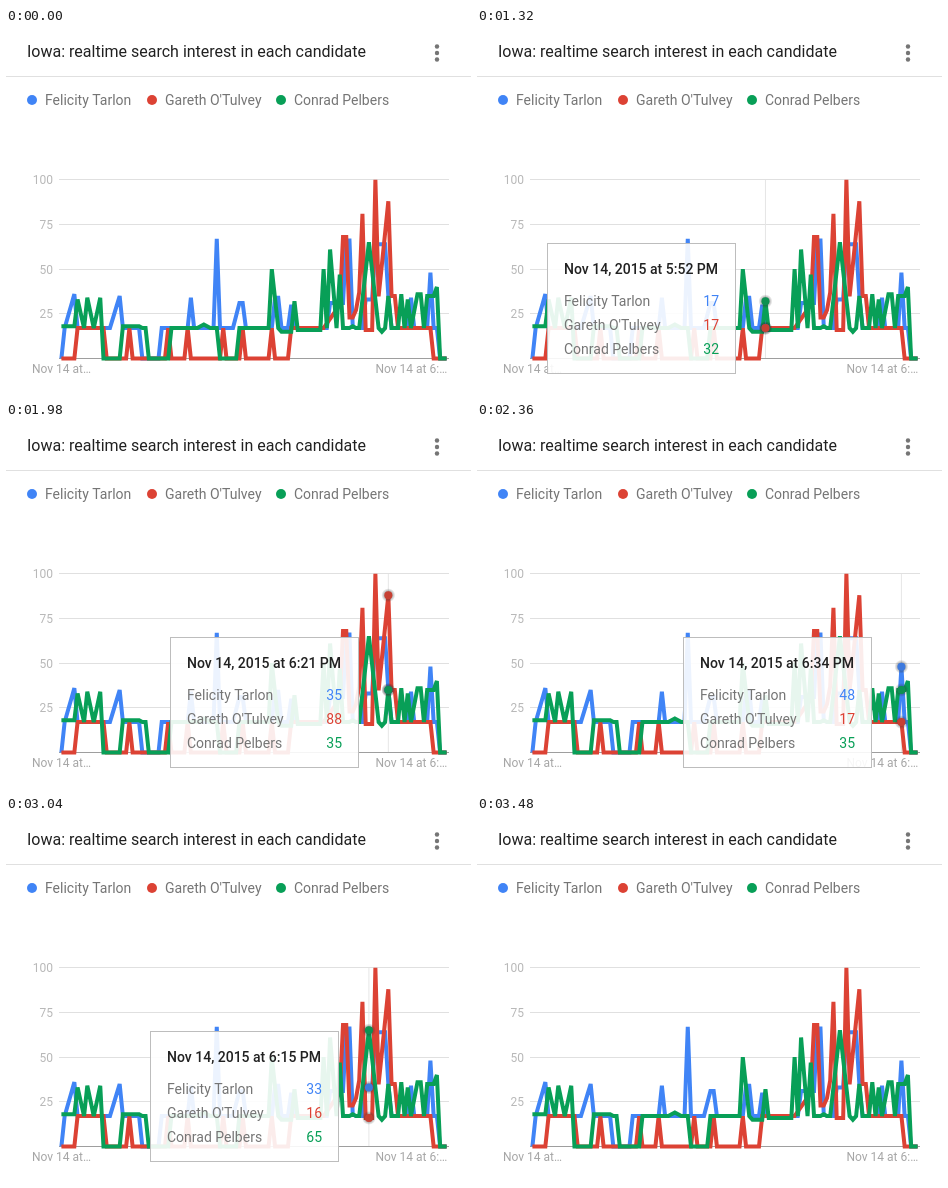
Write an HTML page with a canvas that moves like this. It is 465 px wide and 366 px high and loops after 4.24 s.

```html
<!DOCTYPE html>
<html lang="en">
<head>
<meta charset="utf-8">
<title>Search interest</title>
<style>
html, body { margin: 0; width: 100%; height: 100%; overflow: hidden; background: #fff; }
canvas { display: block; width: 465px; height: 366px; }
</style>
</head>
<body>
<canvas id="stage"></canvas>
<script>
const W = 465, H = 366, LOOP = 4240;
const TOP = 151.8, BASE = 330.5;
const LAST = 119, REST = 17;
const canvas = document.getElementById('stage');
const ctx = canvas.getContext('2d');
const dpr = window.devicePixelRatio || 1;
canvas.width = W * dpr;
canvas.height = H * dpr;
ctx.scale(dpr, dpr);

// A series rests at REST while active and at 0 otherwise.
// active: [from, to]; bumps: [from, to, height, rise, fall], in minutes.
const series = [
  { name: 'Felicity Tarlon', color: '#4084f6', legendX: 26,
    active: [[1, 24], [31, 116]],
    bumps: [[4, 4, 36, 3], [18, 18, 35, 3], [40, 40, 34], [48, 48, 67], [55, 56, 31, 2],
      [66, 67, 34], [71, 71, 30], [83, 87, 31], [88, 89, 66], [90, 90, 18], [94, 96, 33],
      [97, 100, 64], [101, 101, 35], [108, 108, 34], [114, 114, 48]] },
  { name: "Gareth O'Tulvey", color: '#dc4234', legendX: 146,
    active: [[5, 13], [21, 21], [33, 33], [39, 39], [50, 50], [56, 56], [65, 65], [71, 114]],
    bumps: [[86, 86, 30, 5], [87, 88, 68], [89, 90, 23], [92, 92, 37, 2], [93, 93, 81],
      [94, 96, 16], [97, 97, 100], [101, 101, 88, 4], [102, 103, 35]] },
  { name: 'Conrad Pelbers', color: '#089f57', legendX: 275,
    active: [[0, 12], [19, 26], [34, 48], [55, 116]],
    bumps: [[0, 4, 18], [5, 5, 33, 1, 2], [8, 8, 34, 1, 2], [12, 12, 34, 2], [19, 24, 18],
      [44, 44, 19, 2, 2], [65, 65, 50, 1, 2], [68, 71, 15], [72, 72, 32], [73, 80, 16],
      [81, 81, 50], [83, 83, 61, 1, 2], [86, 86, 47], [90, 90, 18], [95, 95, 65, 3, 3],
      [99, 99, 15], [101, 101, 35], [105, 105, 36], [107, 107, 33], [110, 111, 36, 2],
      [113, 115, 35], [116, 116, 40]] }
];

// Pointer sweeps between minutes; it rests in between and leaves at HIDE.
const HIDE = 3480, LEAD = 40;
const sweeps = [
  { start: 1040, end: 1320, from: 46, to: 72, ease: 1 },
  { start: 1460, end: 1980, from: 72, to: 101, ease: 2.2 },
  { start: 2200, end: 2360, from: 101, to: 114, ease: 1.5 },
  { start: 2660, end: 3140, from: 114, to: 93, ease: 1.5 },
  { start: 3200, end: 3240, from: 93, to: 90, ease: 1 },
  { start: 3380, end: 3440, from: 90, to: 78, ease: 1 }
];

const xAt = minute => 55.4 + 3.237 * minute;
const yAt = value => BASE - (BASE - TOP) * value / 100;

function valueAt({ active, bumps }, minute) {
  if (!active.some(([a, b]) => minute >= a && minute <= b)) return 0;
  let offset = 0;
  for (const [from, to, height, rise = 1, fall = 1] of bumps) {
    const away = Math.max((from - minute) / rise, (minute - to) / fall, 0);
    const d = (height - REST) * Math.max(0, 1 - away);
    if (Math.abs(d) > Math.abs(offset)) offset = d;
  }
  return REST + offset;
}

function hoverAt(t) {
  const s = sweeps.filter(s => s.start <= t).pop();
  if (!s || t >= HIDE) return null;
  const p = Math.min(1, (t - s.start + LEAD) / (s.end - s.start + LEAD));
  return Math.round(s.from + (s.to - s.from) * (1 - (1 - p) ** s.ease));
}

function clock(minute) {
  const total = 4 * 60 + 40 + minute;
  return Math.floor(total / 60) + ':' + String(total % 60).padStart(2, '0') + ' PM';
}

function text(str, x, y, size, color, align = 'left', weight = 400) {
  ctx.font = `${weight} ${size}px Roboto, Arial, sans-serif`;
  ctx.fillStyle = color;
  ctx.textAlign = align;
  ctx.fillText(str, x, y);
}

function disc(x, y, r, fill) {
  ctx.fillStyle = fill;
  ctx.beginPath();
  ctx.arc(x, y, r, 0, Math.PI * 2);
  ctx.fill();
}

function rect(x, y, w, h, fill) {
  ctx.fillStyle = fill;
  ctx.fillRect(x, y, w, h);
}

function drawHeader() {
  text('Iowa: realtime search interest in each candidate', 21, 29, 16, '#212121');
  for (const y of [18.5, 25, 31.5]) disc(431, y, 2.2, '#757575');
  rect(0, 48, W, 1, '#e0e0e0');
  for (const s of series) {
    disc(s.legendX, 72, 5, s.color);
    text(s.name, s.legendX + 13, 77, 14, '#757575');
  }
}

function drawAxes() {
  for (const v of [25, 50, 75, 100]) {
    const y = Math.floor(yAt(v));
    rect(53, y, 390, 1, '#e0e0e0');
    text(v, 47, y + 5, 12, '#b8b8b8', 'right');
  }
  rect(53, 330, 390, 1, '#9e9e9e');
  text('Nov 14 at…', 26, 345, 12, '#a6a6a6');
  text('Nov 14 at 6:…', 369.5, 345, 12, '#a6a6a6');
}

function drawLines() {
  ctx.lineWidth = 4;
  ctx.miterLimit = 4;
  for (const s of series) {
    ctx.strokeStyle = s.color;
    ctx.beginPath();
    for (let m = 0; m <= LAST; m++) ctx.lineTo(xAt(m), yAt(valueAt(s, m)));
    ctx.stroke();
  }
}

function drawDots(minute) {
  const x = xAt(minute);
  for (const s of series) {
    const y = yAt(valueAt(s, minute));
    const halo = ctx.createRadialGradient(x, y, 3, x, y, 7);
    halo.addColorStop(0, 'rgba(50,50,50,.5)');
    halo.addColorStop(1, 'rgba(50,50,50,0)');
    disc(x, y, 7, halo);
    disc(x, y, 4, s.color);
    disc(x, y, 4, 'rgba(50,50,50,.12)');
  }
}

function drawTip(minute) {
  const left = Math.round(Math.max(26, xAt(minute) - 218.7));
  rect(left, 215, 189, 131, 'rgba(255,255,255,.9)');
  ctx.strokeStyle = '#bdbdbd';
  ctx.lineWidth = 1;
  ctx.strokeRect(left + 0.5, 215.5, 188, 130);
  text('Nov 14, 2015 at ' + clock(minute), left + 17, 246, 14, '#212121', 'left', 500);
  series.forEach((s, i) => {
    const y = 278 + 24 * i;
    text(s.name, left + 17, y, 14, '#757575');
    text(Math.round(valueAt(s, minute)), left + 172, y, 14, s.color, 'right');
  });
}

function draw(t) {
  const minute = hoverAt(t);
  rect(0, 0, W, H, '#fff');
  drawHeader();
  drawAxes();
  if (minute !== null) rect(xAt(minute) - 0.5, 152, 1, 178, '#e6e6e6');
  drawLines();
  if (minute !== null) {
    drawDots(minute);
    drawTip(minute);
  }
}

const start = performance.now();
function tick() {
  const t = (performance.now() - start) % LOOP;
  draw(Math.floor(t / 20) * 20);
  requestAnimationFrame(tick);
}
tick();
</script>
</body>
</html>
```
